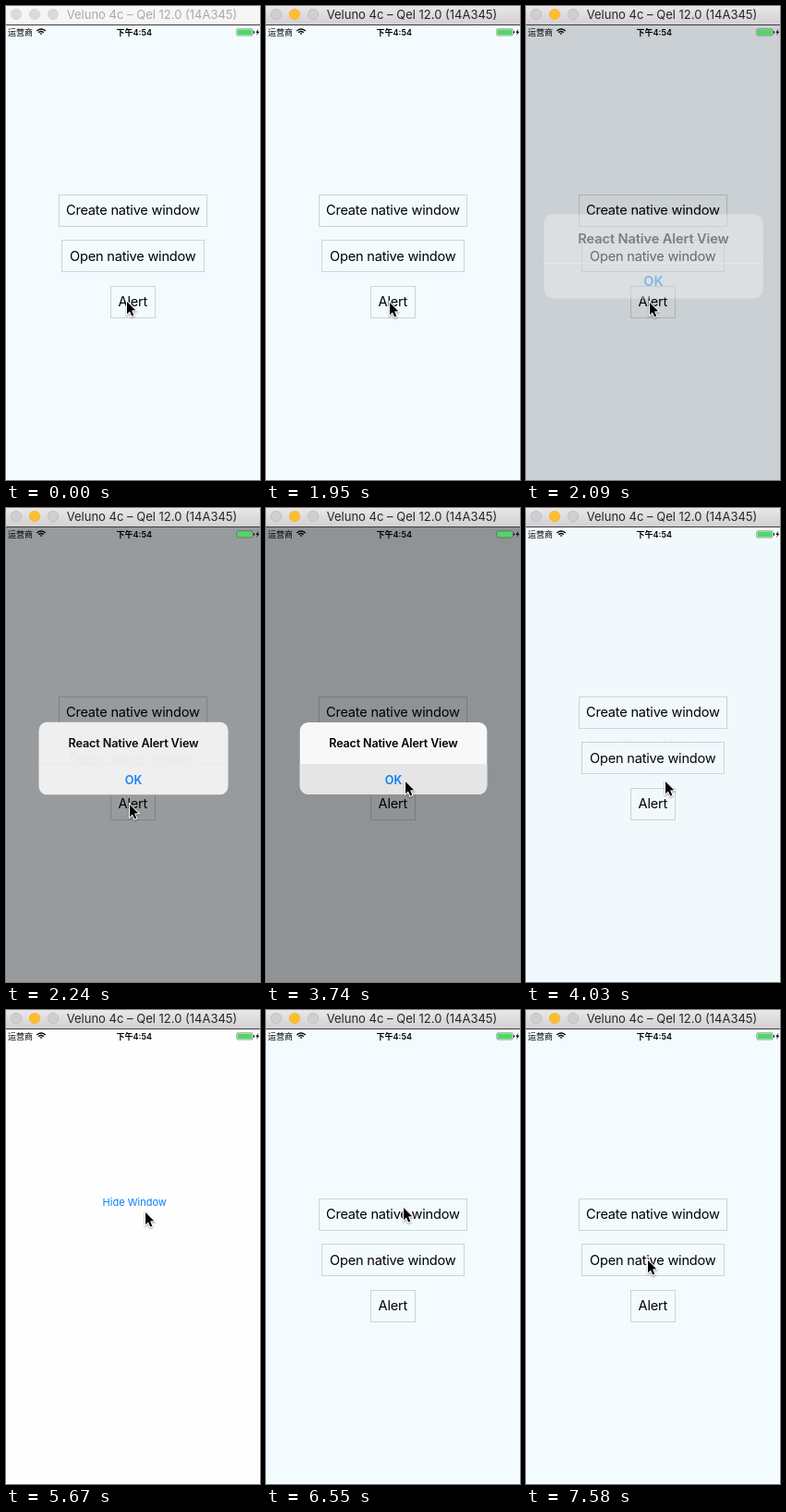
An HTML page with a canvas that plays this animation: 275x513 px, repeating every 8 s.

```html
<!DOCTYPE html>
<html lang="zh">
<head>
<meta charset="utf-8">
<style>
  html, body { margin: 0; width: 100%; height: 100%; overflow: hidden; background: #f4fbff; }
  canvas { display: block; }
</style>
</head>
<body>
<canvas id="stage" width="275" height="513"></canvas>
<script>
const ctx = document.getElementById('stage').getContext('2d');
const SANS = 'Inter, "Noto Sans CJK SC", "Noto Sans CJK", sans-serif';
const BLUE = '#0a7cf6';

// Times in ms
const LOOP = 8000, STEP = 148.2, STEP_OFFSET = 16;
const ACTIVATE = 1950, PRESENT = 2060, PRESS_OK = 3740, DISMISS = 3721;
const SHOW = 5080, PRESS_HIDE = 6260, HIDE = 6410;

const cursorStart = { x: 131, y: 320 };
const cursorMoves = [
  { begin: 0, end: 1050, x: 134, y: 321 },
  { begin: 2680, end: 3120, x: 151, y: 296 },
  { begin: 4030, end: 4720, x: 151, y: 222 },
  { begin: 5500, end: 5940, x: 149.4, y: 212 },
  { begin: 6410, end: 7570, x: 132, y: 271 }
];

const clamp = v => Math.min(1, Math.max(0, v));
const smooth = v => v * v * (3 - 2 * v);
const held = t => STEP_OFFSET + Math.floor((t - STEP_OFFSET) / STEP) * STEP;

function cursorAt(t) {
  let { x, y } = cursorStart;
  for (const move of cursorMoves) {
    const p = smooth(clamp((t - move.begin) / (move.end - move.begin)));
    x += (move.x - x) * p;
    y += (move.y - y) * p;
  }
  return [Math.round(x), Math.round(y)];
}

function alertAt(t) {
  const rest = Math.exp(-Math.max(0, t - PRESENT) / 55);
  const fade = (1 - clamp((t - DISMISS) / 345)) ** 2;
  return { opacity: (1 - rest) * fade, scale: 1 + .3 * rest };
}

function text(str, x, y, size, { weight = 400, color = '#000', align = 'center', spacing = 0 } = {}) {
  ctx.font = `${weight} ${size}px ${SANS}`;
  ctx.letterSpacing = spacing + 'px';
  ctx.textAlign = align;
  ctx.fillStyle = color;
  ctx.fillText(str, x, y);
}

function rect(color, x, y, w, h) {
  ctx.fillStyle = color;
  ctx.fillRect(x, y, w, h);
}

function polygon(points) {
  ctx.beginPath();
  points.forEach(([x, y]) => ctx.lineTo(x, y));
  ctx.closePath();
}

function titleBar(active) {
  const shade = ctx.createLinearGradient(0, 0, 0, 20);
  shade.addColorStop(0, active ? '#e9e7e9' : '#f6f6f6');
  shade.addColorStop(1, active ? '#d2d0d2' : '#f6f6f6');
  rect(shade, 0, 0, 275, 20);
  rect('#3c3c3c', 0, 20, 275, 1);
  for (let i = 0; i < 3; i++) {
    const yellow = active && i === 1;
    ctx.beginPath();
    ctx.arc(11 + 20 * i, 9, 5.7, 0, 7);
    ctx.fillStyle = yellow ? '#fdbe2e' : active ? '#d0ced0' : '#dadada';
    ctx.fill();
    ctx.lineWidth = .6;
    ctx.strokeStyle = yellow ? '#f0b02c' : active ? '#b5b3b5' : '#cfcfcf';
    ctx.stroke();
  }
  text('Veluno 4c – Qel 12.0 (14A345)', 65.7, 14, 13,
    { align: 'left', color: active ? '#262626' : '#a9a9a9' });
}

function statusBar() {
  text('运营商', 2, 32, 9, { align: 'left' });
  text('下午4:54', 138.7, 32, 9, { weight: 600 });

  ctx.strokeStyle = '#000';
  ctx.lineWidth = 1.3;
  for (let r = 1.2; r < 7; r += 2.5) {
    ctx.beginPath();
    ctx.arc(38, 31.2, r, -Math.PI * .77, -Math.PI * .23);
    ctx.stroke();
  }

  ctx.strokeStyle = '#555';
  ctx.lineWidth = .6;
  ctx.beginPath();
  ctx.roundRect(249.8, 24.8, 17.4, 7.2, 1.5);
  ctx.stroke();
  rect('#4cd964', 250.6, 25.6, 15.8, 5.6);
  rect('#000', 267.9, 27.2, 1, 2.5);
  polygon([[273.2, 24.8], [270.4, 28.9], [272.1, 28.9], [271.2, 32], [274.3, 27.7], [272.5, 27.7]]);
  ctx.fill();
}

function button(label, row, width) {
  ctx.strokeStyle = '#cdd4d7';
  ctx.lineWidth = 1;
  ctx.strokeRect(137.5 - width / 2, Math.floor(204 + 49.5 * row) + .5, width, 34);
  text(label, 137.3, Math.round(226 + 49.5 * row), 14.6, { spacing: -.22 });
}

function alertBox({ opacity, scale }, pressed) {
  rect(`rgba(0,0,0,${(pressed ? .415 : .4) * opacity})`, 0, 21, 275, 492);
  ctx.save();
  ctx.globalAlpha = opacity;
  ctx.translate(138, 271);
  ctx.scale(scale, scale);
  ctx.beginPath();
  ctx.roundRect(-101.3, -39, 202.6, 78, 9);
  ctx.clip();
  rect(pressed ? '#f8f8f8' : '#f3f3f3', -102, -39, 204, 78);
  rect(pressed ? '#e5e5e5' : '#e9e9e9', -102, 6, 204, pressed ? 33 : 1);
  text('React Native Alert View', 0, -12, 12.47, { weight: 600, spacing: -.1 });
  text('OK', 0, 27.5, 12.47, { weight: 600, color: BLUE });
  ctx.restore();
}

function cursor(x, y) {
  ctx.save();
  ctx.translate(x, y);
  polygon([[0, 0], [0, 13.2], [3, 10.4], [5.2, 15.6], [7.3, 14.7], [5.1, 9.6], [9.2, 9.3]]);
  ctx.shadowColor = 'rgba(0,0,0,.4)';
  ctx.shadowBlur = 2;
  ctx.shadowOffsetY = 1;
  ctx.strokeStyle = '#fff';
  ctx.lineWidth = 2;
  ctx.stroke();
  ctx.shadowColor = 'transparent';
  ctx.fillStyle = '#000';
  ctx.fill();
  ctx.restore();
}

function draw() {
  const t = performance.now() % LOOP;
  const windowOpen = t >= SHOW && t < HIDE;
  const alert = alertAt(held(t));

  rect(windowOpen ? '#fefefe' : '#f4fbff', 0, 0, 275, 513);
  if (windowOpen) {
    text('Hide Window', 139.2, 212, 11, { color: t < PRESS_HIDE ? BLUE : '#b5d7fc' });
  } else {
    button('Create native window', 0, 160);
    button('Open native window', 1, 154);
    button('Alert', 2, 48);
  }
  if (alert.opacity) alertBox(alert, t >= PRESS_OK);
  statusBar();
  titleBar(t >= ACTIVATE);
  cursor(...cursorAt(held(t)));
  requestAnimationFrame(draw);
}
draw();
</script>
</body>
</html>
```
